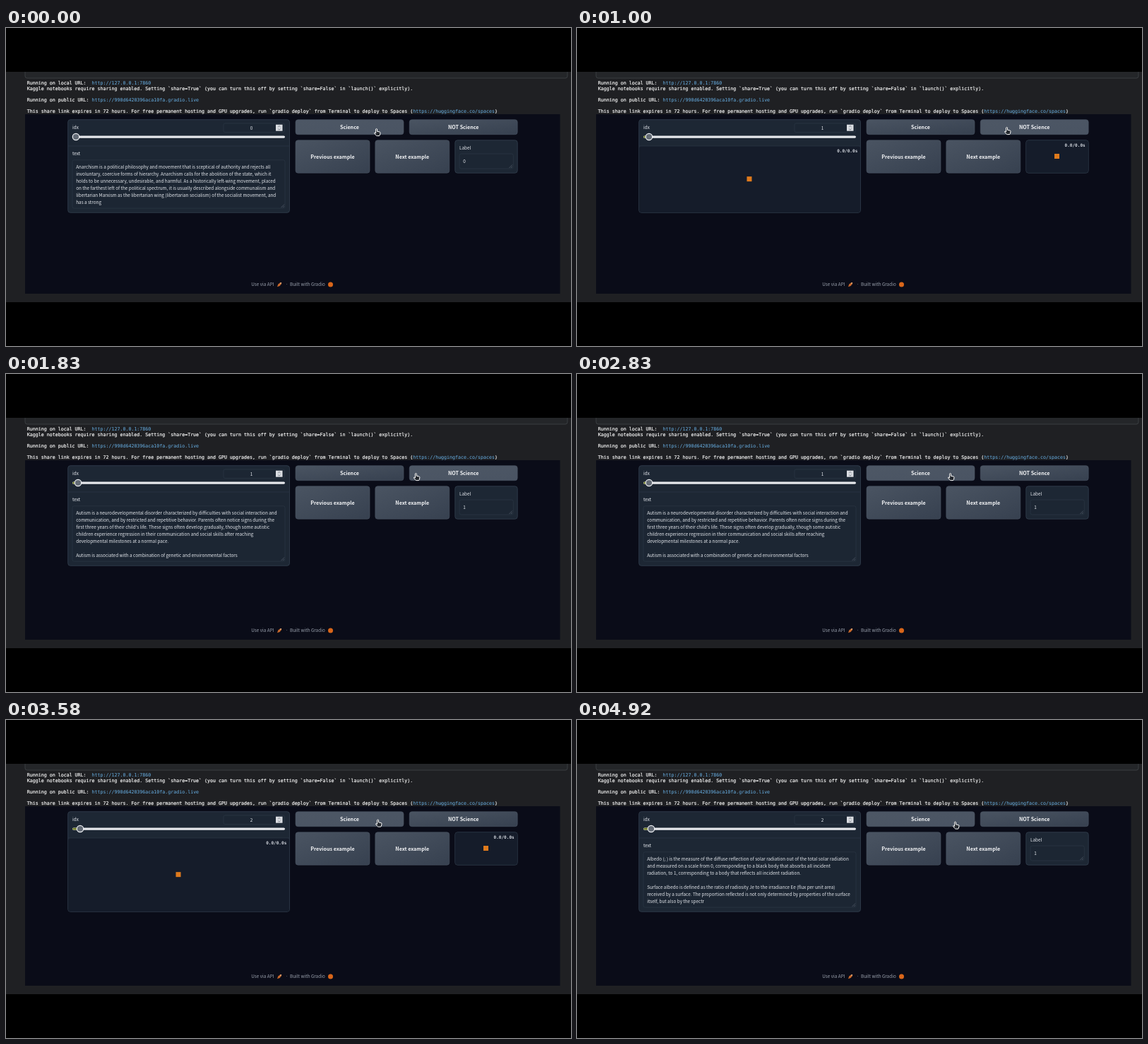
Recreate the animation shown at these times as an HTML page. Size 800 by 450 pixels, loop 5010 ms.

```html
<!DOCTYPE html>
<html lang="en">
<head>
<meta charset="utf-8">
<title>Text labelling app</title>
<style>
html, body { margin: 0; width: 100%; height: 100%; overflow: hidden; background: #000; }
svg { display: block; width: 800px; height: 450px; }
text { font: 6.37px "Noto Sans CJK JP", "Noto Sans CJK SC", "Noto Sans CJK", sans-serif; fill: #e8ebf0; white-space: pre; }
.log text { font: 6.63px "DejaVu Sans Mono", monospace; fill: #f4f4f4; stroke: #f4f4f4; stroke-width: .18px; }
.log tspan { fill: #69b2e8; stroke: none; }
.btn text { font-size: 7.15px; font-weight: 700; text-anchor: middle; fill: #f3f4f6; }
.btn rect { fill: url(#rest); stroke: #4b5563; stroke-width: .6px; }
.btn.hover rect { fill: url(#hover); }
.block { fill: #1d2734; stroke: #344050; stroke-width: .8px; }
.field { fill: #1c2633; stroke: #2c3846; stroke-width: .7px; }
.grip { fill: none; stroke: #66707d; stroke-width: .6px; }
.load rect { fill: #151c2a; }
.load .spin { fill: #df7a1c; }
.load text { font: bold 6.05px "DejaVu Sans Mono", monospace; fill: #d3d7de; text-anchor: end; }
.foot text { fill: #9ca3af; }
</style>
</head>
<body>
<svg viewBox="0 0 800 450">
  <defs>
    <linearGradient id="rest" x2="1" y2="1"><stop stop-color="#4a5462"/><stop offset="1" stop-color="#374150"/></linearGradient>
    <linearGradient id="hover" x2="1" y2="1"><stop stop-color="#4d5765"/><stop offset="1" stop-color="#4a5463"/></linearGradient>
    <clipPath id="band"><path d="M0 62H800V388H0z"/></clipPath>
  </defs>
  <path fill="#1f2023" d="M0 62H800V388H0z"/>
  <rect x="27" y="50" width="768" height="21" rx="3" fill="#242629" stroke="#414447" stroke-width=".8" clip-path="url(#band)"/>
  <g class="log">
    <text x="29.8" y="80.4">Running on local URL:  <tspan>http://127.0.0.1:7860</tspan></text>
    <text x="29.8" y="88.3">Kaggle notebooks require sharing enabled. Setting `share=True` (you can turn this off by setting `share=False` in `launch()` explicitly).</text>
    <text x="29.8" y="104">Running on public URL: <tspan>https://990d6420396aca10fa.gradio.live</tspan></text>
    <text x="29.8" y="119.8">This share link expires in 72 hours. For free permanent hosting and GPU upgrades, run `gradio deploy` from Terminal to deploy to Spaces (<tspan>https://huggingface.co/spaces</tspan>)</text>
  </g>
  <path fill="#0a0c18" d="M27 122H784.500V376H27z"/>

  <rect class="block" id="panel" x="87.700" y="129.700" width="313.800" rx="3.500"/>
  <path stroke="#2b3745" stroke-width=".7" d="M88 167H401.200"/>
  <text x="94" y="142.600">idx</text>
  <rect class="field" x="308" y="135" width="86.500" height="12.500" rx="2"/>
  <text id="number" x="347.500" y="143.800" text-anchor="middle"></text>
  <rect x="382" y="136.700" width="9.500" height="9" fill="#dadde2"/>
  <path d="M385 140.200l1.800-1.700 1.800 1.700M385 142.500l1.800 1.700 1.800-1.700" fill="none" stroke="#666c75" stroke-width=".8"/>
  <rect x="94" y="152.500" width="301" height="3.200" rx="1.600" fill="#e6e8ec"/>
  <rect id="done" x="94.300" y="152.800" height="2.600" rx="1.300" fill="#74802a"/>
  <circle id="thumb" cy="154" r="4.700" fill="#636b76" stroke="#eceef1" stroke-width="1.200"/>
  <g id="story">
    <text x="94" y="179.500">text</text>
    <rect class="field" id="area" x="94" y="186.800" width="301" rx="2.500"/>
    <path class="grip" id="areaGrip" d="M389.500 0l4.500-4.500m-2 4.500l2-2"/>
    <g id="lines"></g>
  </g>

  <g id="buttons"></g>

  <rect class="block" x="635.800" y="158.800" width="88.400" height="46.400" rx="3.500"/>
  <text x="642" y="171.500">Label</text>
  <rect class="field" x="642" y="178" width="76.300" height="21" rx="2.500"/>
  <path class="grip" d="M712.500 198l4.500-4.500m-2 4.500l2-2"/>
  <text id="label" x="647.300" y="191.300"></text>

  <g class="load" id="load">
    <rect id="cover" x="88.100" y="167.400" width="313" rx="3"/>
    <rect x="636.200" y="159.200" width="87.600" height="45.600" rx="3"/>
    <rect class="spin" id="spin" x="240.500" width="7" height="7"/>
    <rect class="spin" x="676" y="178" width="7" height="7"/>
    <text id="timerA" x="397.300" y="175.700"></text>
    <text id="timerB" x="719.700" y="167.700"></text>
  </g>

  <g class="foot">
    <text x="347.300" y="365.400">Use via API</text>
    <path d="M384 366.300l1.400-3.700 2.300-1.900 2.400-.6-.5 2.300-2 2.500z" fill="#c8682c"/>
    <path d="M387.600 360.700l2.500-.6-.5 2.300z" fill="#e5b483"/>
    <text x="395.700" y="365.400">·</text>
    <text x="402" y="365.400">Built with Gradio</text>
    <circle cx="459.500" cy="363" r="3.500" fill="#d9661a"/>
  </g>

  <path id="hand" d="M-2.400-4.500q1-1.100 1.900 0v3.300l3.500.7q1.200.4 1 1.600l-.6 2.900q-.2 1.100-1.300 1.100h-2.800q-.9 0-1.500-.8l-2.200-2.800q-.2-1.300 1.300-.6l.7.500z" fill="#25292f" stroke="#fff" stroke-width="1" stroke-linejoin="round"/>
</svg>
<script>
const LOOP = 5010, STEPS = 60;
const $ = id => document.getElementById(id);
const set = (id, attrs) => { for (const k in attrs) $(id).setAttribute(k, attrs[k]); };

const examples = [
  { label: 0, bottom: 261.3, text: `Anarchism is a political philosophy and movement that is sceptical of authority and rejects all
involuntary, coercive forms of hierarchy. Anarchism calls for the abolition of the state, which it
holds to be unnecessary, undesirable, and harmful. As a historically left-wing movement, placed
on the farthest left of the political spectrum, it is usually described alongside communalism and
libertarian Marxism as the libertarian wing (libertarian socialism) of the socialist movement, and
has a strong` },
  { label: 1, bottom: 271.3, text: `Autism is a neurodevelopmental disorder characterized by difficulties with social interaction and
communication, and by restricted and repetitive behavior. Parents often notice signs during the
first three years of their child's life. These signs often develop gradually, though some autistic
children experience regression in their communication and social skills after reaching
developmental milestones at a normal pace.

Autism is associated with a combination of genetic and environmental factors` },
  { label: 1, bottom: 271.3, text: `Albedo (; ) is the measure of the diffuse reflection of solar radiation out of the total solar radiation
and measured on a scale from 0, corresponding to a black body that absorbs all incident
radiation, to 1, corresponding to a body that reflects all incident radiation.

Surface albedo is defined as the ratio of radiosity Je to the irradiance Ee (flux per unit area)
received by a surface. The proportion reflected is not only determined by properties of the surface
itself, but also by the spectr` }
];
const pages = examples.map(e => e.text.split("\n")
  .map((line, i) => `<text x="99.2" y="${199.3 + i * 9.97}">${line}</text>`).join(""));

// name, x, y, width, height
$("buttons").innerHTML = [
  ["Science", 410, 129.7, 153, 21],
  ["NOT Science", 571.2, 129.7, 153, 21],
  ["Previous example", 410, 158.8, 105, 46.4],
  ["Next example", 522.8, 158.8, 105, 46.4]
].map(([name, x, y, w, h]) => `<g class="btn"><rect x="${x}" y="${y}" width="${w}" height="${h}" rx="3.5"/>
  <text x="${x + w / 2}" y="${y + h / 2 + 2.6}">${name}</text></g>`).join("");
const [science, notScience] = $("buttons").children;

// pointer path: step, x, y
const path = [[0, 526, 147.5], [7, 610, 145.5], [19, 610, 145.5], [24, 530, 145.5],
  [34, 530, 145.5], [40, 528, 146], [44, 528, 146], [47, 537, 149], [60, 537, 149]];
const clicks = [12, 42], LOAD = 2;

function pointer(step) {
  const i = path.findIndex(p => p[0] > step);
  const [s0, x0, y0] = path[i - 1], [s1, x1, y1] = path[i];
  const u = (step - s0) / (s1 - s0), e = u * u * (3 - 2 * u);
  return [x0 + (x1 - x0) * e, y0 + (y1 - y0) * e];
}

let page = -1;
function draw(step) {
  const idx = clicks.filter(c => step >= c).length;
  const age = idx ? step - clicks[idx - 1] : LOAD;
  const loading = age < LOAD;
  const shown = examples[idx], bottom = examples[loading && idx === 1 ? 0 : idx].bottom;
  if (page !== idx) $("lines").innerHTML = pages[page = idx];

  $("number").textContent = idx;
  $("label").textContent = shown.label;
  set("panel", { height: bottom - 129.7 });
  set("area", { height: bottom - 193 });
  set("areaGrip", { transform: `translate(0 ${bottom - 7.2})` });
  set("thumb", { cx: 99 + 3 * idx });
  set("done", { width: idx ? 4 + 3 * idx : 0 });

  $("story").style.display = loading ? "none" : "";
  $("load").style.display = loading ? "" : "none";
  set("cover", { height: bottom - 167.8 });
  set("spin", { y: (167 + bottom) / 2 - 4 });
  $("timerA").textContent = $("timerB").textContent = (age * .1).toFixed(1) + "/0.0s";

  const [x, y] = pointer(step);
  science.classList.toggle("hover", x - 2 < 563);
  notScience.classList.toggle("hover", x - 2 > 571);
  set("hand", { transform: `translate(${x} ${y})` });
}

const start = performance.now();
function tick() {
  const t = (performance.now() - start) % LOOP;
  draw(Math.floor((t + 5) * STEPS / LOOP) % STEPS);
  requestAnimationFrame(tick);
}
tick();
</script>
</body>
</html>
```
